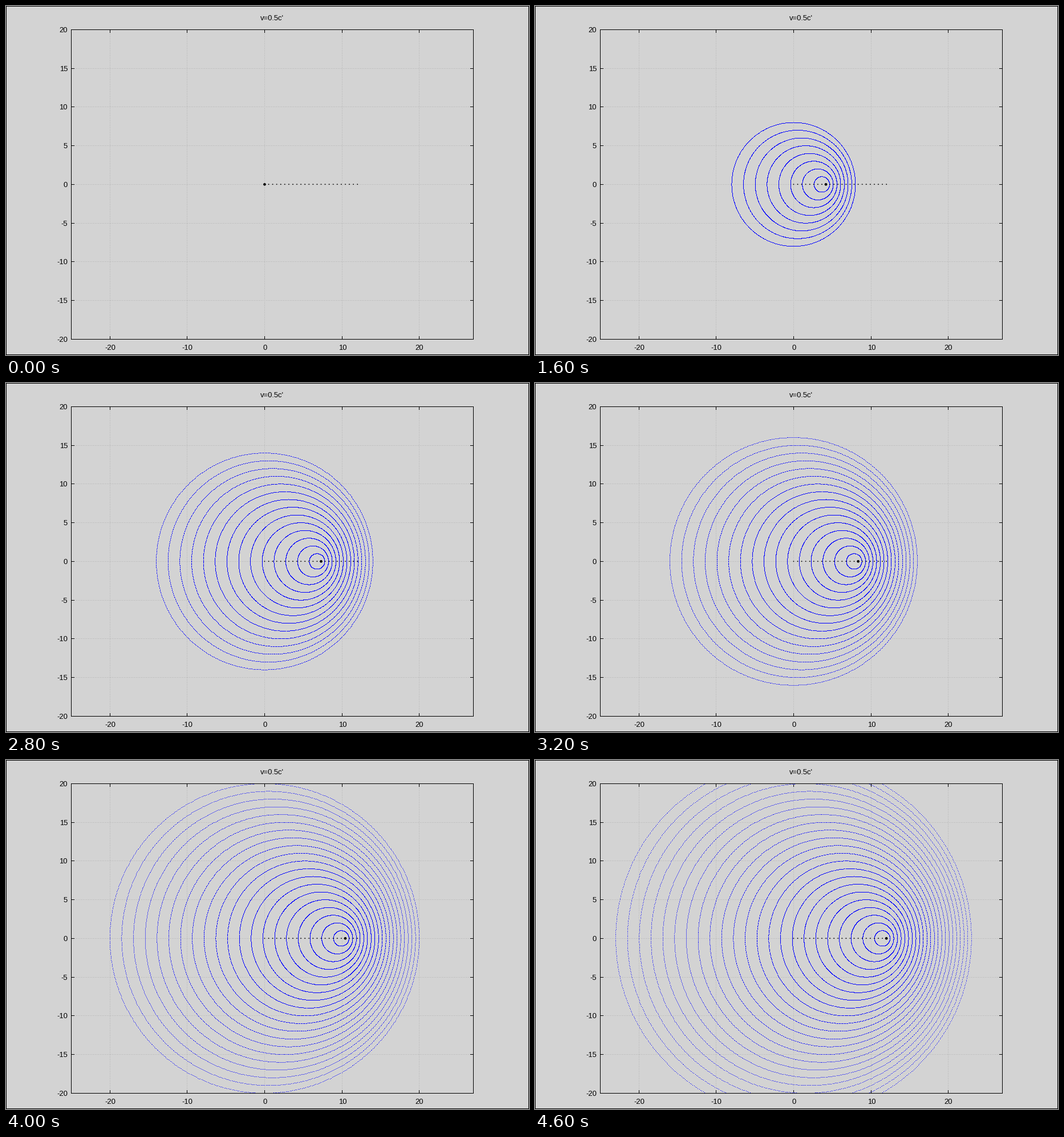
Recreate the animation shown at these times as a matplotlib script. Size 917x611 px, loop 4800 ms.

```python
import numpy as np
import matplotlib.pyplot as plt
from matplotlib.animation import FuncAnimation
from matplotlib.patches import Circle

W, H, DPI = 917, 611, 64
LEFT, RIGHT, TOP, BOTTOM = 114, 819, 41, 583
STEPS = 24
SPEED = 12 / (STEPS - 1)            # distance the emitter moves per step
BG, GRID = (211, 211, 211), (176, 176, 176)
BLACK, BLUE = (0, 0, 0), (0, 0, 255)

fig = plt.figure(figsize=(W / DPI, H / DPI), dpi=DPI)
ax = fig.add_axes([0, 0, 1, 1])
ax.axis("off")

# Lines and dots are one pixel wide and not smoothed, so they go on a raster
base = np.full((H, W, 3), BG, np.uint8)


def to_x(v):
    return LEFT + (v + 25) / 52 * (RIGHT - LEFT)


def to_y(v):
    return 311.9 - v / 40 * (BOTTOM - TOP)


def box(x0, y0, x1, y1):
    base[[y0, y1], x0:x1 + 1] = BLACK
    base[y0:y1 + 1, [x0, x1]] = BLACK


def label(x, y, s, ha="center"):
    ax.text(x, y, s, ha=ha, va="baseline", color="black",
            family="Liberation Sans", size=13 * 72 / DPI)


def disc(x, y, r):
    return ax.add_patch(Circle((x, y), r, fc="black", lw=0))


# Grid, ticks and labels
xticks = range(-20, 21, 10)
yticks = range(-20, 21, 5)
for v in xticks:
    base[TOP:BOTTOM:3, round(to_x(v))] = GRID
for v in yticks:
    base[round(to_y(v)), LEFT:RIGHT:3] = GRID

for v in xticks:
    x = round(to_x(v))
    base[TOP:TOP + 6, x] = BLACK
    base[BOTTOM - 5:BOTTOM, x] = BLACK
    label(x + 1, 602, str(v))

for v in yticks:
    y = round(to_y(v))
    base[y, LEFT:LEFT + 6] = BLACK
    base[y, RIGHT - 5:RIGHT] = BLACK
    label(108, y + 5, str(v), "right")

label(466.5, 25, "v=0.5c'")
box(LEFT, TOP, RIGHT, BOTTOM)
box(0, 0, W - 1, H - 1)

# Emitter path, emitter and wave fronts
raster = ax.imshow(base, extent=(0, W, H, 0), aspect="auto",
                   interpolation="nearest")
for k in range(STEPS):
    disc(to_x(k * SPEED) + 0.5, 312.2, 0.9)
emitter = disc(to_x(0) + 0.5, 312.3, 2.3)
angle = np.linspace(0, 2 * np.pi, 720, endpoint=False)


def update(n):
    k = np.arange(n)[:, None]
    x = np.rint(to_x(k * SPEED + (n - k) * np.cos(angle))).astype(int)
    y = np.rint(to_y((n - k) * np.sin(angle))).astype(int)
    inside = (y > TOP) & (y < BOTTOM)
    view = base.copy()
    view[y[inside], x[inside]] = BLUE
    raster.set_data(view)
    emitter.center = to_x(n * SPEED) + 0.5, 312.3
    return raster, emitter


anim = FuncAnimation(fig, update, frames=STEPS, interval=200,
                     repeat=True, repeat_delay=0)
plt.show()
```
